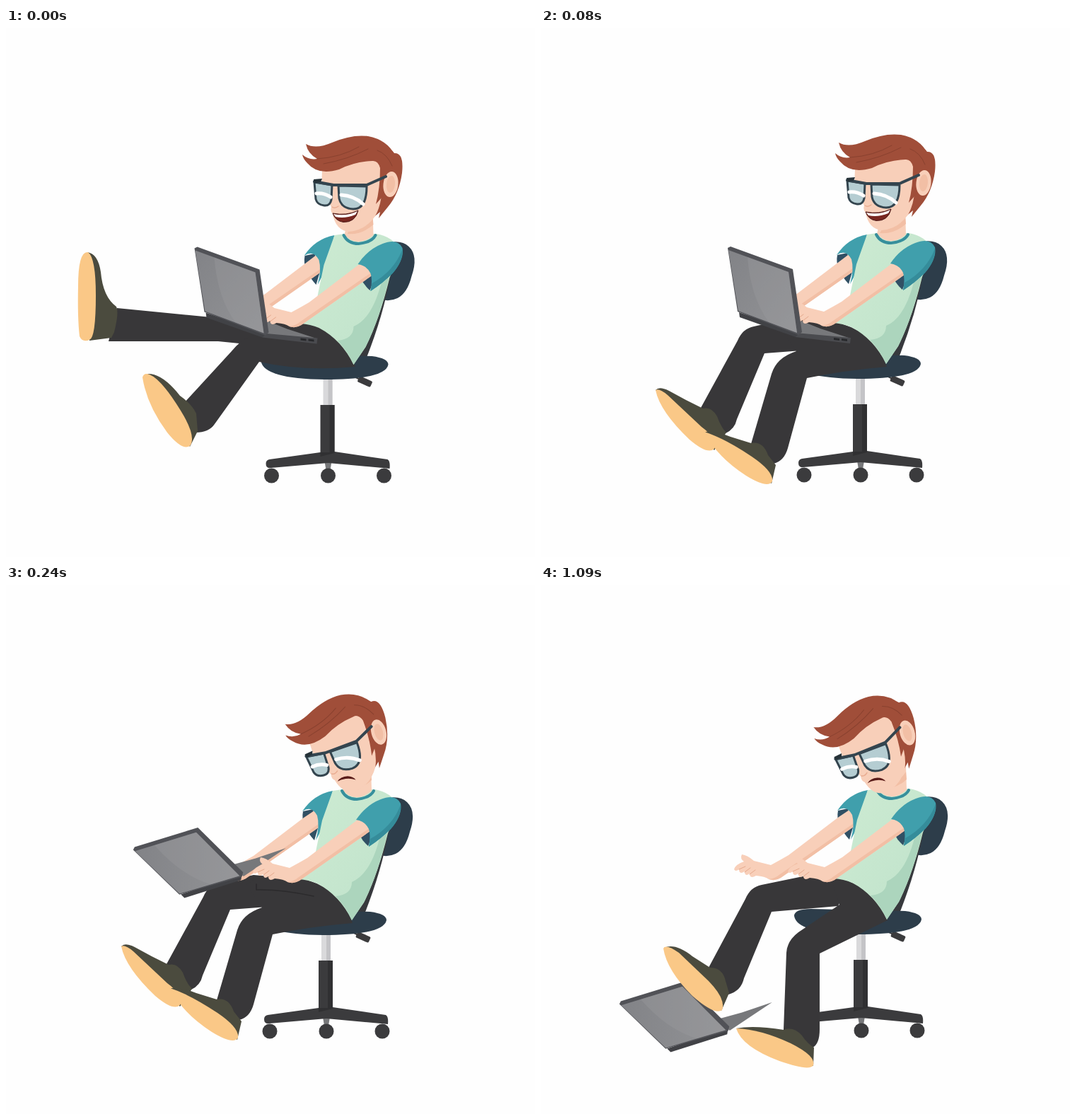
These frames come from a looping animation (748x748 px, 1.6 s). An HTML page:

```html
<!DOCTYPE html>
<html lang="en">
<head>
<meta charset="utf-8">
<title>Office chair</title>
<style>
  html, body { margin: 0; width: 100%; height: 100%; overflow: hidden; background: #fefefe; }
  svg { display: block; width: 100vw; height: 100vh; }
  .pants { fill: #383739; }
  .shoe { fill: #4b4b3e; }
  .sole { fill: #fac887; }
  .skin { fill: #f8cfb9; }
  .shade { fill: #f2bfa5; }
  .teal { fill: #409fac; }
  .cuff { fill: #315064; }
  .iron { fill: #3b3b3d; }
  .navy { fill: #2d3d4a; }
  .line { fill: none; stroke-linecap: round; stroke-linejoin: round; }
</style>
</head>
<body>
<svg viewBox="0 0 748 748">
  <defs>
    <linearGradient id="metal" x1="0" y1="0" x2="1" y2="1">
      <stop offset="0" stop-color="#828387"/>
      <stop offset="1" stop-color="#929396"/>
    </linearGradient>
    <linearGradient id="cloth" x1="0" y1="0" x2="1" y2="1">
      <stop offset="0" stop-color="#cdebd2"/>
      <stop offset="1" stop-color="#bfe2cb"/>
    </linearGradient>
    <g id="arm">
      <path class="skin" d="M421 330L350 384Q338 391 325 398L301 392Q292 384 284 383Q281 389 287 393Q275 397 273 404Q275 408 280 404Q280 412 288 407Q288 415 295 410Q295 418 304 413Q317 414 322 418Q331 421 339 416L446 341L442 316Z"/>
      <path class="shade" d="M446 341L339 416Q331 421 322 418Q331 417 338 411L445 337Z"/>
      <path class="line" stroke="#e5a98d" d="M280 404L289 400M288 408L296 402M295 411L303 405"/>
    </g>
  </defs>

  <g class="body">
    <path class="navy" d="M540 302Q558 299 567 308Q581 321 571 350Q565 374 551 381Q541 386 528 383Z"/>
    <path fill="#37393d" d="M536 350L541 350Q531 405 507 466L496 466Z"/>
    <path fill="#d9d9db" d="M446 490H459V535H446Z"/>
    <path fill="#c4c4c7" d="M453 490H459V535H453Z"/>
    <path fill="#77787a" d="M448 612H458L456 624H450Z"/>
    <path class="iron" d="M442 532H462V598L537 609Q541 611 540 622L530 621L453 614L372 621Q365 622 365 615Q365 610 370 609L442 599Z"/>
    <path fill="#303032" d="M455 532H462V600L442 605V599H455Z"/>
    <g class="iron">
      <circle cx="373" cy="632" r="10.5"/>
      <circle cx="453" cy="632" r="10.5"/>
      <circle cx="532" cy="632" r="10.5"/>
      <rect x="495" y="494.500" width="20" height="9" rx="2" transform="rotate(24 505 499)"/>
    </g>
    <path class="line" stroke="#3b3b3d" stroke-width="2" d="M488 491L498 496"/>
    <path class="navy" d="M358 470Q358 460 382 460L515 463Q538 466 538 475Q534 496 448 496Q362 495 358 470Z"/>
  </g>

  <g id="low"></g>

  <g class="legs">
    <path class="pants" d="M440 418L300 410L157 396L145 443L300 443L330 446Z"/>
    <path class="shoe" d="M115 317Q130 319 134 345Q137 380 156 394Q160 402 153 430L149 438L118 442Z"/>
    <path class="sole" d="M116 317Q127 325 127 378Q127 438 118 441Q108 445 104 436Q101 410 102 365Q102 315 116 317Z"/>
    <path class="pants" d="M430 418Q475 425 494 479Q420 486 358 472L295 560Q287 572 268 572L252 530L319 457Q330 443 345 436Z"/>
    <path class="shoe" d="M200 489Q221 488 246 520Q263 532 269 545L271 570L260 592Z"/>
    <path class="sole" d="M193 494Q199 533 228 572Q249 598 260 591Q270 578 247 541Q220 497 203 490Q195 487 193 494Z"/>
  </g>

  <g class="legs">
    <path class="pants" d="M430 418L350 411L302 422Q286 425 279 442L227 537L262 573Q275 567 278 553L317 460L370 456Z"/>
    <path class="shoe" d="M163 512Q168 506 182 513Q205 526 230 538Q242 535 250 549Q255 564 263 572L246 597Z"/>
    <path class="sole" d="M163 512Q169 542 211 582Q237 604 246 595Q250 580 228 564L180 519Q168 509 163 512Z"/>
    <path class="pants" d="M340 424Q370 404 415 416Q470 425 490 479Q430 484 377 495L350 594Q345 612 330 616L298 588L327 489Q334 466 362 457Z"/>
    <path class="shoe" d="M233 571Q250 570 269 578L298 587Q315 584 322 604L333 618L327 644Z"/>
    <path class="sole" d="M232 571Q248 605 291 633Q322 652 328 641Q330 627 299 606Q260 580 232 571Z"/>
    <path class="line" stroke="#2b2a2c" stroke-width="1.500" d="M354 424V432Q390 431 435 441"/>
  </g>

  <g class="legs">
    <path class="pants" d="M440 412L380 410L312 424Q296 427 289 444L237 541L265 579Q283 574 287 556L326 462L420 454Z"/>
    <path class="shoe" d="M174 513Q190 506 214 525L239 541Q257 541 261 560L266 577L255 602Z"/>
    <path class="sole" d="M173 514Q178 545 214 581Q246 609 256 601Q262 586 237 560L195 520Q176 507 173 514Z"/>
    <path class="pants" d="M410 414Q465 418 490 474L394 521L394 628Q394 649 384 654L343 629L347 520Q348 503 364 491L422 452Z"/>
    <path class="shoe" d="M276 627Q300 622 343 629Q357 624 369 637Q376 648 386 654L385 680Z"/>
    <path class="sole" d="M276 627Q284 653 337 673Q380 688 385 679Q389 666 353 648Q310 628 276 627Z"/>
  </g>

  <g class="body">
    <path class="cuff" d="M420 321Q416 340 436 362L441 345L434 318Z"/>
    <use id="back" href="#arm"/>
    <path class="teal" d="M462 292Q435 297 419 321Q432 312 440 327Q444 341 438 362L450 340Z"/>
    <path fill="url(#cloth)" d="M462 292L476 290H521Q545 294 556 314L540 352Q526 410 506 450L489 475Q472 440 440 423Q428 418 414 417Q436 396 439 373L447 334Z"/>
    <path fill="#acd5bd" d="M539 352Q526 410 506 450L489 475Q480 455 466 441Q489 439 489 421Q515 410 528 360Z"/>
    <path class="skin" d="M481 270L476 291Q494 311 517 292L516 258Z"/>
    <path class="shade" d="M483 285Q505 284 516 266L517 277Q500 292 480 290Z"/>
    <path class="line" stroke="#378f9c" stroke-width="4" d="M475 292Q481 304 496 304Q515 302 520 292"/>
  </g>

  <g id="high">
    <g id="base">
      <path fill="#77787b" d="M360 411L395 425L438 439L366 435Z"/>
      <path class="edge" fill="#4a4b4f" d="M360 431L438 438L437 446L360 437Z"/>
      <path class="edge" fill="#28292c" d="M414 438L422 439V442L414 441ZM425 439L433 440V443L425 442Z"/>
      <path fill="#414246" d="M280 402L281 409L360 437L366 431Z"/>
    </g>
  </g>

  <g class="body">
    <path class="cuff" d="M497 333Q494 354 512 370L520 350L510 330Z"/>
    <use href="#arm" x="76" y="3"/>
    <path class="teal" d="M495 333Q509 312 530 304Q551 296 558 310Q561 326 544 346Q530 360 513 371Q516 355 513 346Q508 335 495 333Z"/>
    <path fill="#358c9a" d="M558 312Q559 329 544 346Q530 360 513 371L515 360Q546 343 558 312Z"/>
  </g>

  <g id="lid">
    <path fill="#515257" d="M264 311L268 309L356 341L369 430L364 434L278 401Z"/>
    <path fill="url(#metal)" d="M265 314L350 345L362 431L279 400Z"/>
    <path fill="#9a9b9e" opacity=".35" d="M292 324L350 345L362 431L322 416Q296 380 292 324Z"/>
  </g>

  <g id="head">
    <path fill="#a04e39" d="M500 160Q535 160 546 175Q560 174 557 203Q553 232 537 251L524 267L526 258L515 267Q524 251 521 232Z"/>
    <path class="skin" d="M444 199L443 225L457 251Q455 257 459 261Q463 284 482 286Q505 284 519 264Q530 245 529 210L526 184Q480 181 444 199Z"/>
    <path fill="#a04e39" d="M421 162Q435 170 458 160Q486 148 509 151Q536 156 547 178L541 210L530 218L529 237L520 247Q526 225 526 196Q523 185 515 186Q490 187 468 198Q438 207 423 189Q417 183 416 177Q425 185 437 183Q424 176 421 162Z"/>
    <path class="line" stroke="#89412f" d="M437 183Q470 181 496 166M446 190Q480 184 509 169M522 171Q536 176 543 193"/>
    <ellipse class="skin" cx="541" cy="219" rx="10.500" ry="18" transform="rotate(6 541 219)"/>
    <ellipse class="shade" cx="541" cy="219" rx="6" ry="12" transform="rotate(6 541 219)"/>
    <path class="line" stroke="#e9ad92" stroke-width="1.500" d="M458 251Q462 254 467 250"/>
    <g stroke="#34454f" stroke-width="3" stroke-linejoin="round">
      <path fill="#b5cdd2" d="M433 216L458 220L457 241Q455 250 447 249Q437 248 435 240Z"/>
      <path fill="#b5cdd2" d="M467 221L507 222Q507 254 488 254Q471 253 468 239Z"/>
      <path class="line" stroke-width="4" d="M433 215L460 220L507 220L534 208"/>
    </g>
    <path fill="#263238" d="M432 212L444 211L442 216L433 217Z"/>
    <path class="line" stroke="#fff" stroke-width="5" stroke-linecap="butt" d="M436 232Q447 231 456 237M471 234Q489 235 502 247"/>
    <g id="smile">
      <path fill="#792720" stroke="#4b1917" d="M459 260Q478 264 495 256Q491 273 474 272.500Q463 271 459 260Z"/>
      <path fill="#fff" d="M460 261Q478 265 494 257L491 262Q476 268 463 265Z"/>
    </g>
    <path id="frown" fill="#5a1c19" d="M462 264Q468 259 478 262Q485 265 487 271Q481 266 474 264.500Q467 263 462 264Z"/>
  </g>
</svg>
<script>
const $ = id => document.getElementById(id);
const all = name => [...document.querySelectorAll(name)];
const show = (el, on) => el.style.display = on ? '' : 'none';
const move = (el, value) => el.setAttribute('transform', value);

// Places a part so that its pivot lands on x, y, turned by angle
const pin = (x, y, angle, px, py) =>
  `translate(${x} ${y}) rotate(${angle}) translate(${-px} ${-py})`;

// body: shift; head and laptop: x, y, angle
const poses = [
  { body: [2.5, 1], legs: 0, head: [544, 221, 0], laptop: [267.5, 310.5, 0] },
  { body: [-1, 0], legs: 1, head: [541, 219, 0], laptop: [265, 310, 0] },
  { body: [0, 0], legs: 1, head: [529, 216, -14.5], laptop: [199, 310, 0] },
  { body: [0, -1], legs: 1, head: [527, 208, -20.5], laptop: [180, 373, -37] },
  { body: [0, -2], legs: 2, head: [518, 209, -22], laptop: [111, 591, -37] }
];
const bodies = all('.body'), legs = all('.legs'), edges = all('.edge');
const STEP = 80, LOOP = 1600;
let last = -1;

function pose(i) {
  const p = poses[i], shift = `translate(${p.body})`;
  const laptop = pin(...p.laptop, 265, 310);
  const typing = i < 2, fallen = i === 4;
  bodies.forEach(el => move(el, shift));
  legs.forEach((el, k) => show(el, k === p.legs));
  move(legs[1], shift);
  move($('head'), pin(...p.head, 541, 219));
  show($('smile'), i < 3);
  show($('frown'), i > 2);

  // While typing the far hand is drawn back behind the lid
  move($('back'), typing ? 'translate(14 -9)' : '');

  // On the floor the laptop lies behind the feet
  $(fallen ? 'low' : 'high').append($('base'));
  if (fallen) $('low').append($('lid'));
  else $('head').before($('lid'));
  move($('base'), laptop);
  move($('lid'), laptop);
  edges.forEach(el => show(el, typing));
}

function tick() {
  const i = Math.min(4, Math.floor(performance.now() % LOOP / STEP));
  if (i !== last) pose(last = i);
  requestAnimationFrame(tick);
}
tick();
</script>
</body>
</html>
```
